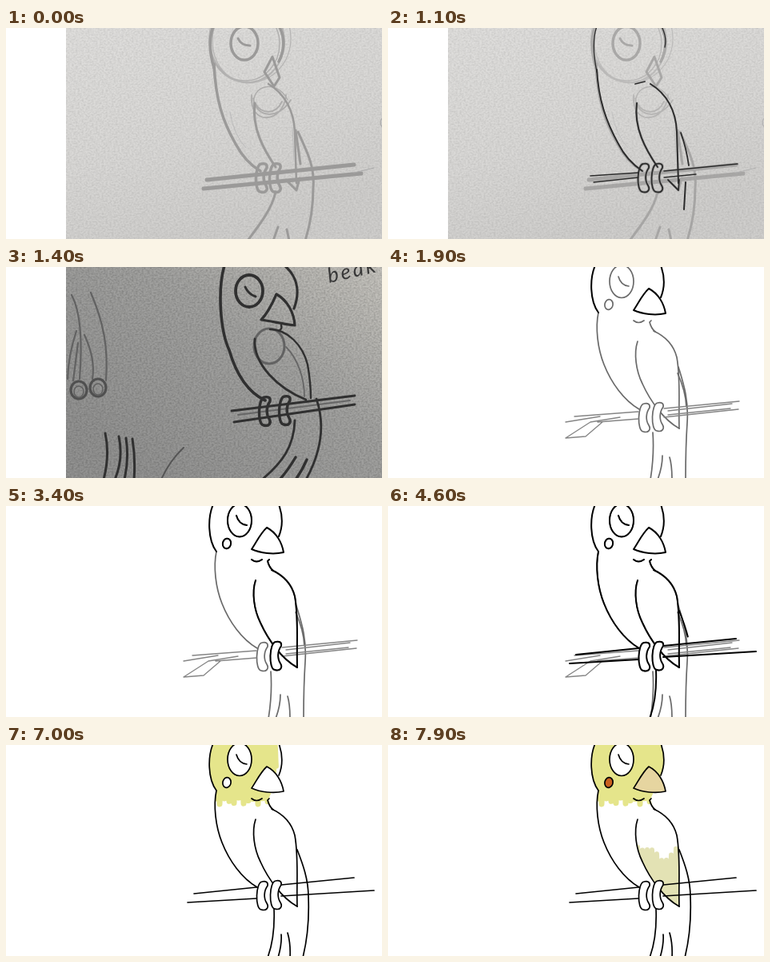
An HTML page for the animation above (8 s loop, 470x264 px).

```html
<!DOCTYPE html>
<html lang="en">
<head>
<meta charset="utf-8">
<title>Drawing a bird</title>
<style>
html, body { margin: 0; width: 100%; height: 100%; overflow: hidden; background: #fff }
svg { display: block; width: 470px; height: 264px }
path { fill: none; stroke-linecap: round; stroke-linejoin: round }
text { font: italic 26px Lato, sans-serif; fill: #383838 }
</style>
</head>
<body>
<svg viewBox="0 0 470 264">
  <defs>
    <linearGradient id="light" x2=".4" y2="1">
      <stop stop-color="#dfdedc"/><stop offset=".6" stop-color="#d8d7d5"/><stop offset="1" stop-color="#cfcecc"/>
    </linearGradient>
    <linearGradient id="dark" x1=".1" y1=".8" x2="1" y2="0">
      <stop stop-color="#929291"/><stop offset=".55" stop-color="#a2a2a0"/><stop offset="1" stop-color="#c6c4be"/>
    </linearGradient>
    <filter id="grain" color-interpolation-filters="sRGB">
      <feTurbulence type="fractalNoise" baseFrequency=".4 .5" numOctaves="2" seed="4"/>
      <feColorMatrix values="0 0 0 0 0  0 0 0 0 0  0 0 0 0 0  .35 0 0 0 -.12"/>
    </filter>
    <clipPath id="sheet"><path d="M75 0H470V264H75Z"/></clipPath>
    <clipPath id="bodyClip"><path d="M259 -3C252 14 252 42 263 57C260 75 262 100 270 122H335L332 80L328 68L341 38C346 26 346 12 341 -3Z"/></clipPath>
    <clipPath id="wingClip"><path id="wingShape"/></clipPath>
  </defs>
  <g id="photo1" clip-path="url(#sheet)">
    <rect x="75" width="395" height="264" fill="url(#light)"/>
    <rect x="75" width="395" height="264" filter="url(#grain)" opacity=".5"/>
    <g id="pencil"/>
    <g id="ink1"/>
  </g>
  <g id="photo2" clip-path="url(#sheet)">
    <rect x="75" width="395" height="264" fill="url(#dark)"/>
    <rect x="75" width="395" height="264" filter="url(#grain)"/>
    <g id="marks"/>
    <text transform="translate(404 20) rotate(-13)" letter-spacing="3">beak</text>
  </g>
  <g id="clean">
    <g clip-path="url(#bodyClip)" id="headFill"/>
    <g clip-path="url(#wingClip)" id="wingFill"/>
    <g id="spots"/>
    <g id="sketch"/>
    <g id="ink2"/>
  </g>
</svg>
<script>
const $ = id => document.getElementById(id);
const moving = [];

function draw(group, d, stroke, width, from, to) {
  const p = document.createElementNS('http://www.w3.org/2000/svg', 'path');
  p.setAttribute('d', d);
  p.setAttribute('stroke', stroke);
  p.setAttribute('stroke-width', width);
  $(group).append(p);
  if (to) {
    p.setAttribute('pathLength', 1);
    moving.push({ p, from, to });
  }
  return p;
}

const oval = (x, y, rx, ry, tilt = 0) =>
  `M${x} ${y - ry}A${rx} ${ry} ${tilt} 1 0 ${x} ${y + ry}A${rx} ${ry} ${tilt} 1 0 ${x} ${y - ry}Z`;
const foot = (x, y) =>
  `M${x - 1} ${y - 17}C${x - 9} ${y - 16} ${x - 10} ${y + 17} ${x - 2} ${y + 18}C${x + 5} ${y + 20} ${x + 8} ${y + 15} ${x + 5} ${y + 10}C${x + 1} ${y + 4} ${x + 1} ${y - 5} ${x + 6} ${y - 12}C${x + 7} ${y - 17} ${x + 3} ${y - 18} ${x - 1} ${y - 17}Z`;

// First sheet: soft pencil, then ink over it
const side = 'M260 45C262 90 271 117 287 145C296 162 306 172 318 179';
const branchTop = 'M251 190L435 171', branchLow = 'M247 201L444 182';
const wingEdge = 'M328 70C348 82 360 103 361 130L363 194';
const wingIn = 'M311 94C307 125 322 152 337 174';
for (const [d, w, c = '#9b9a99'] of [
  [oval(301, 17, 47, 51), 1.4, '#b0afae'], [oval(305, 13, 51, 55), 1.2, '#b5b4b3'],
  [oval(299, 20, 43, 46), 1.4, '#b0afae'], [oval(303, 16, 45, 53), 1.2, '#b5b4b3'],
  ['M307 84C304 124 347 119 350 84M309 88C312 112 340 116 356 90M312 95C320 108 337 109 345 92', 1.8, '#adacab'],
  ['M310 98C305 70 340 64 352 90', 1.4, '#adacab'],
  [side, 3.5], [branchTop, 5], [branchLow, 5], [wingEdge, 2.5], [wingIn, 3],
  ['M260 -4C253 12 254 30 260 50', 3.5],
  ['M341 -3C350 14 347 30 341 42', 3.5],
  [oval(298, 19, 17, 21), 3.5], ['M290 13Q294 22 305 22', 3],
  ['M333 36L323 55L335 73L342 62Z', 3],
  ['M365 130C378 158 386 175 384 200C384 225 380 247 374 266', 3],
  ['M362 128L368 170', 3], ['M350 190L363 203L367 188', 3],
  ['M337 205C333 225 318 245 302 266', 3],
  ['M340 249L334 266M351 252L354 266', 3],
  [foot(320, 187), 3.5], [foot(337, 187), 3.5],
  ['M280 105Q285 135 300 150M358 125L360 165', 1, '#bbb'],
  ['M435 181L460 175M471 112Q465 118 471 125', 1.2, '#aaa']
]) draw('pencil', d, c, w);

[
  ['M261 -2C255 15 257 35 261 55', 1.3],
  ['M261 52C263 90 273 118 288 145C296 161 306 171 318 179', 1.9],
  ['M309 70L321 67', 1.8], [wingIn, 1.9], [wingEdge, 1.9],
  ['M366 131C371 145 374 158 376 172', 1.8],
  ['M350 190L363 203L364 190', 1.8], ['M372 193L370 227', 2],
  [foot(320, 187), 1.8], [foot(337, 187), 1.8],
  ['M253 185L313 181M345 179L437 170', 1.6],
  ['M257 193L313 187M345 187L385 183', 1.3],
  ['M342 -2Q349 12 346 24', 1.3]
].forEach(([d, w], i) => draw('ink1', d, '#2b2b2b', w, i * 78, i * 78 + 150));

// Second sheet
for (const [d, w, c = '#303030'] of [
  ['M273 -2C264 30 268 80 279 104C288 135 303 157 324 167', 3.6],
  ['M348 -2C362 10 369 28 360 52', 3.2],
  [oval(304, 30, 17, 20), 3.8], ['M299 25Q303 34 312 37', 3],
  ['M338 34C332 48 325 60 319 66C333 68 345 71 361 73C360 57 352 42 338 34Z', 3.2],
  ['M344 73Q346 78 340 80', 2.5],
  [oval(329, 99, 19, 22), 3, '#626262'],
  ['M311 90C309 122 340 152 375 166', 2.8],
  ['M330 78C352 78 371 98 377 122Q381 145 381 164', 2.4],
  ['M350 100C365 115 373 140 373 162', 1.8, '#666'],
  ['M282 180L436 161M285 194L436 172', 2.8], ['M290 185L430 167', 1.8, '#666'],
  [foot(324, 180), 3.4], [foot(349, 179), 3.4],
  ['M361 192C360 225 345 245 320 266', 2.8],
  ['M388 165C400 200 392 235 375 266', 2.8],
  ['M362 238Q352 255 342 266M376 241Q370 255 362 266', 3.4],
  ['M82 35Q98 65 92 140M106 32C122 70 128 100 125 142M88 80Q78 110 77 140M98 85Q112 115 108 140M90 95L84 142', 2.2, '#626262'],
  [oval(91, 154, 10, 11), 3.2, '#505050'], [oval(115, 151, 10, 11), 3.2, '#505050'],
  [oval(91, 156, 6, 7), 1.5, '#606060'], [oval(115, 153, 6, 7), 1.5, '#606060'],
  ['M124 208Q130 235 122 266M141 212Q147 240 136 266M150 214Q154 240 148 266M158 215Q162 240 160 266', 3],
  ['M222 226Q204 243 194 266', 2, '#555']
]) draw('marks', d, c, w);

// Clean drawing
const headL = 'M259 -2C252 14 252 42 263 57', headR = 'M341 -2C346 12 346 26 341 38';
const beak = 'M326 27C318 34 312 47 307 54C318 59 334 61 347 58C345 46 338 33 326 27Z';
const eye = oval(292, 18, 15, 20.5), lid = 'M288 12Q291 23 301 24';
const cheek = oval(276, 47, 5, 6.3, 12);
const chin = 'M307 67Q313 72 320 67', neck = 'M329 67L327 69Q329 77 334 81';
const belly = 'M263 57C259 76 262 102 270 122C279 145 295 167 314 178';
const wingL = 'M312 93C307 108 310 130 318 146C327 166 344 191 364 202';
const wingR = 'M332 80C345 86 357 97 361 113C366 140 363 175 364 202';
const back = 'M364 131C371 149 378 168 378 190C379 215 377 242 371 266';
const tail = 'M335 205C336 230 333 250 327 266';
const plumes = 'M340 266Q345 249 344 237M352 235Q356 249 355 266';
const feet = [foot(321, 188), foot(338, 187)];
$('wingShape').setAttribute('d', 'M312 93C307 108 310 130 318 146C327 166 344 191 364 202C363 175 366 140 361 113Z');

for (const d of [belly, wingL, wingR, lid, eye, cheek, chin, neck, ...feet,
  'M363 125C369 145 376 165 374 195Q372 225 372 266', 'M362 133Q372 155 373 175',
  'M331 207Q333 235 328 266M337 266Q343 250 343 236M352 238Q355 248 355 266'
]) draw('sketch', d, '#6a6a6a', 1.7).style.fill = feet.includes(d) ? '#fff' : 'none';
draw('sketch', 'M233 187L313 181M345 177L439 168M262 194L313 190M345 188L438 178M222 194L265 187M222 214L253 194L290 188M222 214L247 212L268 194M350 180L430 171M350 185L428 177', '#858585', 1.3);

const lines = [
  [headL, 1400, 1700], [headR, 1500, 1800], [beak, 1500, 1900],
  [eye, 2600, 2900], [lid, 2800, 2900], [cheek, 2800, 3000],
  [chin, 2900, 3000], [neck, 2900, 3000], [wingR, 2900, 3200],
  [wingL, 3000, 3300], [feet[1], 3200, 3400], [feet[0], 3400, 3700],
  [belly, 3600, 3900], ['M235 186L313 178', 3800, 4000], ['M344 175L435 166', 3900, 4100],
  ['M227 197L313 192', 4000, 4200], ['M344 189L460 182', 4100, 4400],
  [tail, 4300, 4500], [back, 4500, 4900], [plumes, 4900, 5300]
].map(([d, a, b]) => {
  const p = draw('ink2', d, '#000', 2, a, b);
  if (feet.includes(d)) p.style.fill = '#fff';
  return p;
});

// Colour is brushed on in zigzags that leave a ragged edge
function zigzag(x0, x1, step, top, bottom) {
  let d = '';
  for (let x = x0, i = 0; x <= x1; x += step, i++)
    d += `${i ? 'L' : 'M'}${x} ${i % 2 ? bottom(x) : top(x)}`;
  return d;
}
draw('headFill', zigzag(252, 350, 3, () => -6, x => 70 + 4 * Math.sin(x * 1.7)), '#e5e58b', 7, 6200, 7100);
draw('wingFill', zigzag(306, 370, 3, x => 143 - Math.abs(x - 343) * .6 + 4 * Math.sin(x * 1.9), () => 208), '#e3e2b4', 6, 7400, 7900);
const fill = (d, color) => {
  const p = draw('spots', d, 'none', 0);
  p.style.fill = color;
  return p;
};
fill(eye, '#fff');
const beakFill = fill(beak, '#fff');
const cheekFill = fill(cheek, '#fff');

const show = (el, on) => el.style.display = on ? '' : 'none';
function frame(now) {
  const t = Math.floor(now % 8000 / 100) * 100;
  show($('photo1'), t < 1400);
  show($('photo2'), t >= 1400 && t < 1500);
  show($('clean'), t >= 1500);
  show($('sketch'), t < 5400);
  $('pencil').style.opacity = t < 1000 ? 1 : .75;
  for (const { p, from, to } of moving) {
    const k = Math.min(1, (t - from) / (to - from));
    show(p, t > 0 && k > 0);
    p.setAttribute('stroke-dasharray', k < 1 ? `${Math.max(0, k)} 2` : 'none');
  }
  for (const p of lines) p.setAttribute('stroke-width', t < 5400 ? 2 : 1.7);
  beakFill.style.fill = t < 7200 ? '#fff' : '#e6d5a0';
  cheekFill.style.fill = t < 7300 ? '#fff' : '#c9601f';
  requestAnimationFrame(frame);
}
requestAnimationFrame(frame);
</script>
</body>
</html>
```
